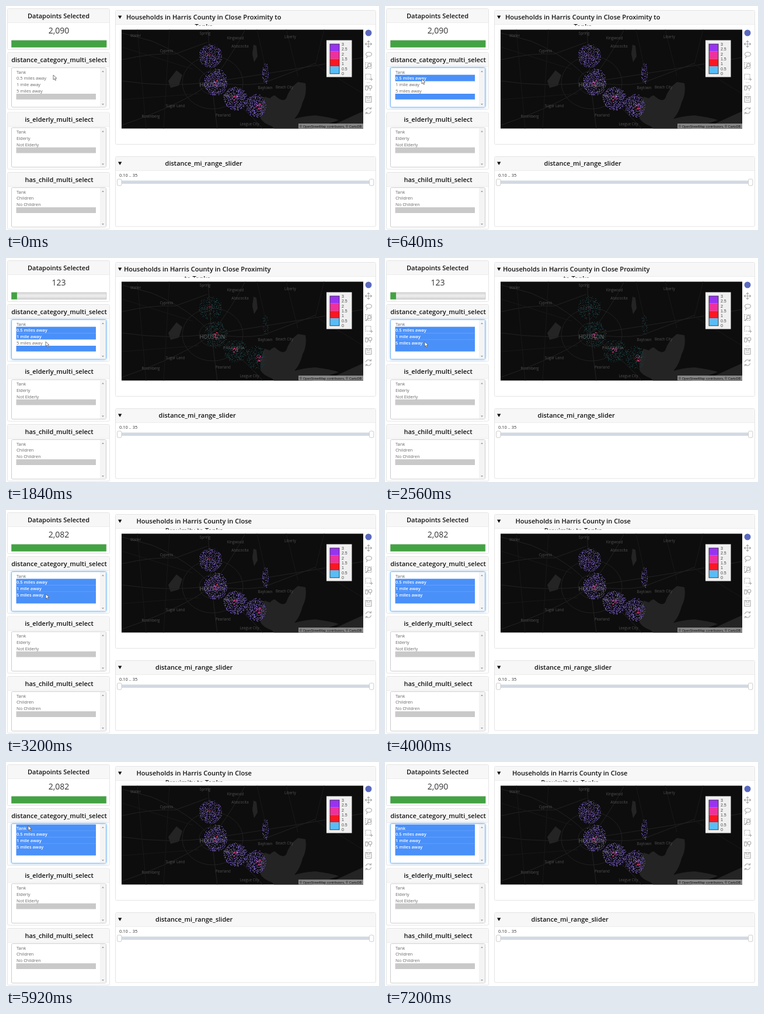
Animation of 639 by 383 pixels, one loop 7.6 s. Source, as an HTML page:

```html
<!DOCTYPE html>
<html lang="en">
<head>
<meta charset="utf-8">
<title>Dashboard</title>
<style>
html, body { margin: 0; width: 100%; height: 100%; overflow: hidden; background: #fff; }
svg { display: block; width: 639px; height: 383px; font-family: "Open Sans", "Noto Sans", sans-serif; }
.head { font-size: 11px; font-weight: 600; fill: #111; text-anchor: middle; }
.title { font-size: 11.1px; }
.item { font-size: 7.5px; fill: #666; }
.item.on { fill: #fff; font-weight: 600; }
.map text { fill: #505050; text-anchor: middle; }
.map .credit { font: 5.6px "Liberation Sans", sans-serif; fill: #111; text-anchor: start; }
.icons { fill: none; stroke: #a8a8a8; stroke-width: 1.1; }
.tick { font: 7px "Liberation Sans", sans-serif; fill: #444; }
</style>
</head>
<body>
<svg id="stage" viewBox="0 0 639 383" xmlns="http://www.w3.org/2000/svg"></svg>
<script>
const LOOP = 7600, TOTAL = 2090;
const BLUE = '#4a90f9';
const updates = [880, 1680, 3040, 6000];     // dashboard refreshes
const counts = [2090, 38, 123, 2082, 2090];
const clicks = [5360, 560, 1200, 2560];      // when each distance row gets selected
const cursorPath = [                         // time, x, y
  [0, 81, 118], [80, 81, 118], [480, 63, 125], [880, 63, 125], [1040, 64, 134],
  [1680, 64, 134], [1840, 68, 143], [3760, 68, 144], [3920, 172, 150],
  [4640, 172, 156], [5200, 38, 109], [6000, 38, 109], [6320, 60, -12], [LOOP, 60, -12]
];

let seed = 11;
const rnd = () => (seed = (seed * 16807) % 2147483647) / 2147483647;
const stage = document.getElementById('stage');
const $ = id => document.getElementById(id);

const rect = (x, y, w, h, fill, more = '') =>
  `<rect x="${x}" y="${y}" width="${w}" height="${h}" fill="${fill}" ${more}/>`;
const text = (x, y, s, cls, more = '') => `<text x="${x}" y="${y}" class="${cls}" ${more}>${s}</text>`;
const path = (d, more = '') => `<path d="${d}" ${more}/>`;

function card(x, y, w, h) {
  return rect(x + .5, y + .5, w, h, '#fff', 'rx="2" stroke="#e4e4e4"') +
    rect(x + 1, y + 1, w - 1, 23, '#f7f7f7') + rect(x + 1, y + 24, w - 1, 1, '#ececec');
}

function list(y, title, items, id) {
  const top = y + 27, row = i => top + .8 + 10.8 * i;
  let s = card(2, y, 175, 97) + text(91, y + 16.5, title, 'head') +
    rect(9.5, top - .5, 162, 67.5, '#fff', `id="${id}box" rx="2" stroke="#ccc"`) +
    rect(161, top, 10, 66.5, '#f4f4f4') +
    path(`M164 ${top + 7}l2-2.5 2 2.5zM164 ${top + 61}l2 2.5 2-2.5z`, 'fill="#a0a0a0"');
  items.forEach((label, i) => {
    s += rect(17.5, row(i), 136.5, 11, BLUE, `id="${id}bg${i}" visibility="hidden"`) +
      text(18, row(i) + 8.8, label, 'item', `id="${id}t${i}"`);
  });
  return s + rect(17.5, row(items.length), 136.5, 9.8, '#c9c9c9', `id="${id}blank"`);
}

// Map dots: ellipses of households [cx, cy, rx, ry, count]
const areas = [[350, 85, 20, 20, 500], [359, 130, 20, 23, 620], [393, 158, 20, 20, 560],
  [428, 170, 17, 20, 500], [444, 115, 5.5, 18, 100]];
const hot = [[359, 132, 5, 6], [393, 157, 6, 5], [433, 171, 6, 6], [348, 86, 5, 4]];

function dots([cx, cy, rx, ry], n) {
  let d = '';
  while (n-- > 0) {
    const a = rnd() * 2 * Math.PI, r = Math.sqrt(rnd());
    d += `M${Math.round(cx + rx * r * Math.cos(a))} ${Math.round(cy + ry * r * Math.sin(a))}h1v1h-1z`;
  }
  return d;
}
const cloud = share => areas.map(a => dots(a, a[4] * share)).join('');
const centres = (...n) => n.map((k, i) => dots(hot[i], k)).join('');

const places = [['Waller', 222, 53], ['Spring', 341, 49], ['Liberty', 487, 55], ['Kingwood', 393, 57],
  ['Atascocita', 401, 71], ['Cypress', 275, 79], ['Baytown', 444, 142], ['Beach City', 477, 141],
  ['Sugar Land', 290, 173], ['Rosenberg', 248, 191], ['Pearland', 372, 189], ['League City', 417, 204]];

function mapView() {
  let s = '<clipPath id="clip"><rect x="198" y="40.5" width="414" height="169"/></clipPath>' +
    '<g class="map" clip-path="url(#clip)">' + rect(198, 40, 414, 170, '#0d0d0d') +
    path('M443 155L452 158Q460 150 463 155Q475 165 480 158Q486 140 500 130L513 132Q516 150 508 165Q504 182 494 193Q510 188 530 187Q555 190 570 195L545 204L520 211H460L456 206Q440 200 436 192Q434 170 443 155Z' +
      'M545 211Q580 194 612 180V211Z' +
      'M278 128l14-18 10 8-6 18-14 4ZM424 66l5 2 2 18-6 10-3-14Z', 'fill="#242424"') +
    path('M198 128Q280 140 352 130T612 88M352 130Q320 90 250 60L198 46M352 130L346 40M352 130Q390 80 410 40M352 130Q310 165 198 204M352 130Q410 175 440 210M352 130L362 210M352 130Q400 138 440 132L530 98M198 92Q250 80 290 82L345 62',
      'fill="none" stroke="#222" stroke-width="1"') +
    '<g fill="none" stroke="#202020"><ellipse cx="354" cy="131" rx="23" ry="20"/><ellipse cx="354" cy="131" rx="52" ry="45"/></g>' +
    path('M225 40L240 210M280 40L270 210M198 160L330 150M430 40L450 130M480 40L500 120M545 40L530 100L612 150M198 70L320 108',
      'fill="none" stroke="#181818"');
  for (const [name, x, y] of places) s += text(x, y, name, '', 'font-size="6.2"');
  s += text(353.5, 138, 'HOUSTON', '', 'font-size="9" style="fill:#6c6c6c"') +
    text(390.5, 155.5, 'PASADENA', '', 'font-size="7.3" style="fill:#606060"') +
    path(cloud(.45), 'id="faint" fill="#183a3d"') +
    `<g id="far">${path(cloud(.62), 'fill="#4d3c80"')}${path(cloud(.38), 'fill="#7059b2"')}</g>` +
    path(centres(16, 14, 20, 4), 'id="mile" fill="#d0409a"') +
    path(centres(10, 9, 10, 2), 'fill="#ee2f48"') +
    path(centres(3, 2, 3), 'id="tank" fill="#8fc8f4"') +
    rect(501, 201, 111, 9, '#868686') +
    text(503, 207.5, '© OpenStreetMap contributors, © CartoDB', 'credit') + '</g>';
  s += rect(549, 58.5, 43.5, 63, '#efefef');
  ['#9a32f2', '#ee309e', '#fb1620', '#58bdf6'].forEach((c, i) => s += rect(555, 65 + i * 12.7, 16, 12.7, c));
  s += rect(555, 65, 16, 50.8, 'none', 'stroke="#222" stroke-width=".8"');
  for (let i = 0; i < 7; i++) s += text(575, 68 + i * 8.3, 3 - i / 2, 'tick');
  return s;
}

const icons = '<circle cx="621" cy="46" r="5.5" fill="#5b6abf"/><g class="icons">' +
  path('M615.5 65h11M621 59.5v11M619 61.5l2-2 2 2M619 68.5l2 2 2-2M617.5 63l-2 2 2 2M624.5 63l2 2-2 2') +
  '<ellipse cx="621.5" cy="82.5" rx="5" ry="3.5"/>' + path('M618 85q2 2-1 4') +
  rect(615.5, 97, 10.5, 9.5, 'none', 'stroke-dasharray="2 1"') +
  '<circle cx="622.5" cy="101" r="2.7" fill="#fff"/>' + path('M620.5 103l-4 4.5', 'stroke-width="1.8"') +
  rect(616, 116.5, 9, 8.5, 'none', 'stroke-dasharray="2 1.2"') + path('M623.5 125.5h5M626 123v5') +
  '<rect x="615.5" y="136" width="4.5" height="8" rx="2.2"/><circle cx="624" cy="138.5" r="2.8"/>' +
  path('M624 141v4M617.8 137v2') +
  path('M617.5 150.5h7M617.5 131h7', 'stroke="#ccc" stroke-width=".8"') +
  path('M616 154.5h10v10h-10zM618.5 154.5v3h5v-3M618 161h6') +
  path('M616.3 178a5 5 0 0 1 8.5-2.5M625.7 180a5 5 0 0 1-8.5 2.5M625.5 173v3h-3M616.5 185v-3h3') + '</g>';

const arrow = y => path(`M192 ${y}h6.4l-3.2 5.4z`, 'fill="#111"');
const handle = x => rect(x, 296, 7.5, 11, '#fff', 'rx="2" stroke="#ccc"');

stage.innerHTML =
  '<defs><linearGradient id="track" x2="0" y2="1"><stop stop-color="#d6d6d6"/><stop offset=".5" stop-color="#eee"/><stop offset="1" stop-color="#d2d2d2"/></linearGradient>' +
  '<clipPath id="headClip"><rect x="188" y="8" width="446" height="25.5"/></clipPath></defs>' +
  card(2, 4, 175, 70) + text(90, 20.5, 'Datapoints Selected', 'head') +
  text(90.5, 47, '', '', 'id="count" font-size="14" fill="#333" text-anchor="middle"') +
  rect(9.5, 59, 162.5, 11.5, 'url(#track)', 'stroke="#b8b8b8" stroke-width=".6"') +
  rect(9.3, 58.7, 0, 12, '#43a343', 'id="bar"') +
  list(79, 'distance_category_multi_select', ['Tank', '0.5 miles away', '1 mile away', '5 miles away'], 'd') +
  list(181.5, 'is_elderly_multi_select', ['Tank', 'Elderly', 'Not Elderly'], 'e') +
  list(284, 'has_child_multi_select', ['Tank', 'Children', 'No Children'], 'c') +
  card(187, 7, 446, 229) + arrow(16.5) +
  `<g clip-path="url(#headClip)">${text(0, 23, '', 'head title', 'id="line1"')}${text(0, 39.3, '', 'head title', 'id="line2"')}</g>` +
  mapView() + icons +
  card(187, 257, 446, 119.5) + arrow(266.5) + text(0, 273, 'distance_mi_range_slider', 'head', 'id="slider"') +
  text(194, 292, '0.10 .. 35', 'item', 'style="fill:#333"') +
  rect(194, 298.5, 433, 5.5, '#d2d9e2', 'rx="1"') + handle(190.5) + handle(622.5) +
  path('M0 0v8l1.9-1.7 1.4 3 1.4-.7-1.4-2.8 2.6-.2z', 'id="cursor" fill="#fff" stroke="#555" stroke-width=".8"');

const show = (id, on) => $(id).setAttribute('visibility', on ? 'visible' : 'hidden');

function titleLines(step) {
  const start = 'Households in Harris County in Close';
  if (step < 1) return [start + ' Proximity to', 'Tanks'];
  return step < 3 ? [start + ' Proximity', 'to Tanks'] : [start, 'Proximity to Tanks'];
}

function cursorAt(t) {
  const i = Math.max(1, cursorPath.findIndex(k => k[0] > t));
  const [t0, x0, y0] = cursorPath[i - 1], [t1, x1, y1] = cursorPath[i];
  const u = (t - t0) / (t1 - t0), e = u * u * (3 - 2 * u);
  return [x0 + (x1 - x0) * e, y0 + (y1 - y0) * e];
}

function draw(now) {
  const t = now % LOOP;
  const step = updates.filter(u => t >= u).length;
  const centre = 338.7 - 5.5 * step;

  $('count').textContent = counts[step].toLocaleString('en-US');
  $('bar').setAttribute('width', 163 * counts[step] / TOTAL);
  titleLines(step).forEach((s, i) => $('line' + (i + 1)).textContent = s);
  for (const id of ['line1', 'line2', 'slider']) $(id).setAttribute('x', centre);

  const focused = t >= clicks[1];
  $('dbox').setAttribute('stroke', focused ? '#7db8f5' : '#ccc');
  $('dbox').style.filter = focused ? 'drop-shadow(0 0 2px #8fc4f8)' : '';
  $('dblank').setAttribute('fill', focused ? BLUE : '#c9c9c9');
  clicks.forEach((c, i) => {
    show('dbg' + i, t >= c);
    $('dt' + i).classList.toggle('on', t >= c);
  });

  const far = step === 0 || step > 2;
  show('far', far);
  show('faint', !far);
  show('mile', step !== 1);
  show('tank', step === 0 || t >= 5920);

  const [x, y] = cursorAt(t);
  $('cursor').setAttribute('transform', `translate(${x} ${y})`);
  show('cursor', t < 3920 || t >= 4640 && t < 6320);
}

const begin = performance.now();
function tick() {
  draw(performance.now() - begin);
  requestAnimationFrame(tick);
}
tick();
</script>
</body>
</html>
```
